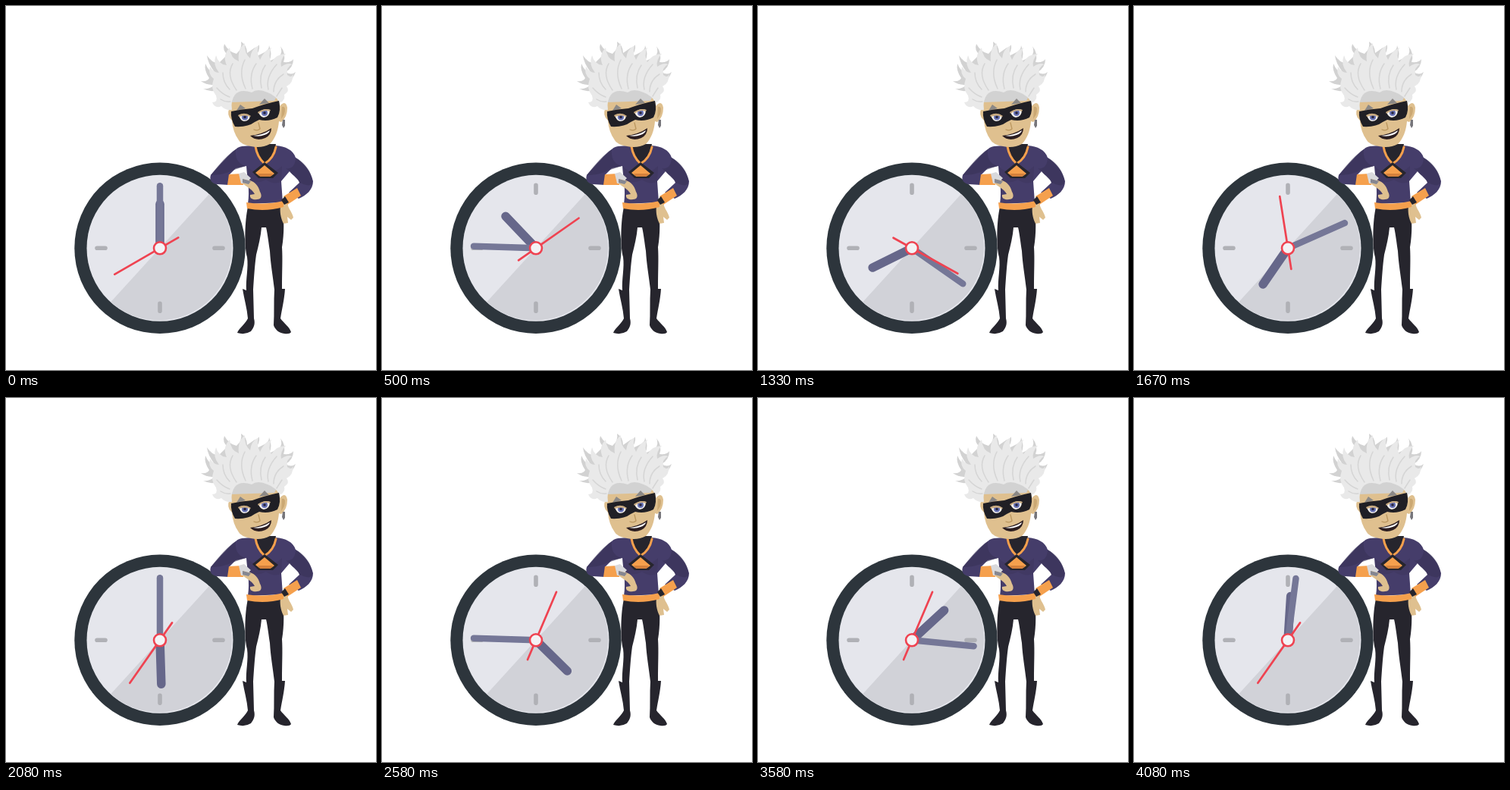
Recreate the animation shown at these times as an HTML page. Size 488 by 480 pixels, loop 4160 ms.

```html
<!DOCTYPE html>
<html lang="en">
<head>
<meta charset="utf-8">
<title>Hero and clock</title>
<style>
  html, body { margin: 0; width: 100%; height: 100%; overflow: hidden; background: #fff; }
  svg { display: block; width: 488px; height: 480px; }
  .skin { fill: #dfc08f; }
  .suit { fill: #453d6a; }
  .suit-dark { fill: #393258; }
  .dark { fill: #26252d; }
  .orange { fill: #f5a04d; }
  .line { fill: none; stroke-linecap: round; stroke-linejoin: round; }
</style>
</head>
<body>
<svg viewBox="0 0 488 480">
  <g id="clock" transform="translate(203 319.3)">
    <circle r="112.7" fill="#2d353c"/>
    <circle r="96.5" fill="#e5e6ec"/>
    <path d="M65-71.3A96.5 96.5 0 0 1-65 71.3Z" fill="#d1d2d8"/>
    <path class="line" stroke="#b0b1b6" stroke-width="5.6" d="M0-83V-73M0 73V83M-83 0H-72M72 0H83"/>
    <g class="line">
      <path id="hour" stroke="#66678a" stroke-width="11.5" d="M0 0V-58"/>
      <path id="minute" stroke="#757797" stroke-width="8.5" d="M0 0V-82"/>
      <path id="second" stroke="#ef4351" stroke-width="2.7" d="M0 28V-69"/>
    </g>
    <circle r="8" fill="#f3f3f5" stroke="#ef4351" stroke-width="2.6"/>
  </g>

  <g id="hero">
    <!-- legs and boots -->
    <path class="dark" d="M319 265L364 264C367 281 367 300 364 318C365 334 364 350 364 373L368 373C367 388 364 399 362 412C366 418 374 423 376 430Q374 433 367 432C360 431 355 427 353 421C354 405 353 390 354 374C352 356 349 341 348 323C346 310 345 300 343 292L337 292C336 304 333 316 330 328C328 342 327 359 326 374L327 412C329 419 327 424 323 429Q315 434 305 431C307 425 316 419 319 412C318 399 314 386 312 373L317 375C316 360 320 345 318 331C314 316 315 283 319 265Z"/>

    <!-- hand on hip -->
    <path class="skin" d="M363 256L372 259C370 265 377 270 379 279L376 282L371 278L372 286L366 287C362 279 361 271 362 263Z"/>

    <!-- torso and arms -->
    <path class="suit" d="M330 184C319 185 309 183 303 189C294 196 284 207 270 223C268 229 271 234 278 235L294 236L295 222L303 214L317 211C318 227 322 242 319 261L365 259L363 231L374 218C379 224 386 228 387 233L373 246L386 254C396 250 405 242 405 231C402 218 393 207 382 200C379 190 369 185 355 184Z"/>
    <path class="suit-dark" d="M303 189C292 196 282 208 270 223C277 223 289 222 298 217L316 211C305 208 302 199 303 189ZM382 200C382 210 376 216 369 214L374 218C379 224 386 228 387 233C393 235 400 239 404 234C405 219 393 206 382 200Z" opacity=".6"/>
    <path class="suit-dark" d="M318 212Q329 222 340 217Q352 223 364 211L363 232Q352 236 343 229Q332 235 319 231Z" opacity=".35"/>
    <path class="dark" d="M329 182L356 182L354 193L342 208L331 196Z"/>
    <path class="line" stroke="#f5a04d" stroke-width="3" d="M329 185Q331 199 341 208Q353 201 356 186"/>
    <path class="dark" d="M341 206L359 220L352 227H333L325 219Z"/>
    <path class="orange" d="M341 210L354 221L350 224H334L329 220Z"/>
    <path fill="#d4813b" d="M332 221H352L349 225H335Z"/>
    <path class="orange" d="M317 259Q342 263 366 257L366 265Q342 272 318 267ZM366 251L384 240L389 250L371 262ZM294 222L311 221L313 236L292 236Z"/>
    <path class="dark" d="M363 256L368 251L373 259L367 262Z"/>

    <!-- resting hand -->
    <path class="skin" d="M311 224L322 230C328 232 333 237 335 245C338 250 337 255 331 255C326 256 321 254 322 249L328 248C324 241 318 239 312 234Z"/>
    <path fill="#d9d9dc" d="M307 221L314 219L323 227L320 230L313 228L313 234L310 234Z"/>
    <path fill="#858792" d="M312 228L323 231L320 235L312 233Z"/>

    <!-- head -->
    <path class="skin" d="M296 120L324 107L360 119L361 132Q369 123 371 134Q371 147 363 153L360 152C359 164 355 175 348 182Q337 188 323 185Q309 182 307 177Q299 166 298 151Q290 144 295 134Z"/>
    <path fill="#cba873" d="M364 133Q370 131 367 143L363 149Z"/>
    <path fill="#77767b" d="M365 150H368V158L366 161L364 157Z"/>

    <!-- hair -->
    <path fill="#d2d2d2" d="M278 103Q267 106 257 99Q266 100 268 95Q261 85 263 76Q268 88 275 87Q266 75 265 65Q272 76 281 75L292 64Q285 58 288 50Q294 61 304 63Q312 56 310 47Q318 52 318 62L328 55Q332 55 334 51Q335 59 329 67L341 61Q347 58 347 52Q352 64 347 73L361 66Q365 60 362 53Q370 63 366 74Q376 75 379 70Q379 81 369 87Q376 92 382 87Q377 101 367 99L354 125L297 127ZM276 103Q270 110 260 109Q270 114 278 111Z"/>
    <path fill="#e9e9e9" d="M298 137Q289 138 284 132Q276 136 272 127Q280 127 277 118Q269 109 274 96Q266 90 269 80Q274 88 281 88Q272 77 277 65Q280 77 291 78Q285 65 295 55Q296 69 307 73Q305 57 315 49Q314 62 322 69Q323 57 333 52Q330 62 335 71Q340 59 350 55Q345 66 350 74Q357 63 369 63Q361 71 363 80Q372 74 377 77Q369 81 371 91Q378 96 379 88Q379 102 370 106Q375 112 367 117Q369 124 361 128Q356 118 345 114Q332 108 324 114Q309 109 302 117Q296 125 298 137Z"/>
    <g class="line" stroke="#d5d5d5" stroke-width="1.5">
      <path d="M286 88Q286 101 295 110M299 76Q290 91 304 111M315 71Q306 88 316 109M330 76Q320 90 325 109M342 78Q333 91 337 108M357 77Q342 94 346 110M366 90Q353 98 353 113M278 108Q286 117 295 120M283 123Q289 127 296 126M364 108Q360 114 357 119"/>
    </g>

    <!-- mask and face -->
    <path fill="#8b8886" d="M304 138L309 130L316 135ZM334 130L341 122L347 128Z"/>
    <path fill="#201f25" d="M297 139Q311 136 325 135Q341 129 360 125Q363 138 358 147Q346 153 334 150L328 153Q319 160 302 159Q296 149 297 139Z"/>
    <g id="eyes">
      <path fill="#f4f1ed" d="M307 144Q316 140 322 145Q321 152 314 152Q309 151 307 144ZM333 140Q342 134 348 137Q348 146 340 147Q335 146 333 140Z"/>
      <circle cx="315" cy="146.5" r="4" fill="#6671b5"/>
      <circle cx="341" cy="141" r="4" fill="#6671b5"/>
      <circle cx="315" cy="146.5" r="1.8" fill="#25253d"/>
      <circle cx="341" cy="141" r="1.8" fill="#25253d"/>
      <path fill="#c8aa80" d="M306 144Q315 139 323 145L322 146Q315 143 307 146ZM332 140Q341 134 349 137L348 139Q341 136 333 142Z"/>
    </g>
    <path class="line" stroke="#bb975f" stroke-width="1.3" d="M333 154L335 162Q332 165 327 163"/>
    <path fill="#2b1d20" d="M322 171Q339 169 350 161Q350 170 342 174Q330 179 322 171Z"/>
    <path fill="#fff" d="M326 171Q339 170 348 164Q347 168 341 170Q334 173 326 171Z"/>
  </g>
</svg>
<script>
  const LOOP = 4160, STEP = 1000 / 12;
  const hands = ["hour", "minute", "second"].map(id => document.getElementById(id));
  const start = performance.now();

  // All hands run backwards; the faster two rest briefly after each turn.
  function angles(tick) {
    const sweep = 32 * (tick % 12 - 0.22);
    return [
      -360 * tick / 49.5,
      -360 * (tick % 25) / 24.5,
      240 - Math.min(360, Math.max(0, sweep))
    ];
  }

  function draw(now) {
    const time = Math.max(0, now - start) % LOOP;
    const tick = Math.floor((time + 5) / STEP);
    angles(tick).forEach((angle, i) => hands[i].setAttribute("transform", `rotate(${angle})`));
    requestAnimationFrame(draw);
  }
  draw(start);
</script>
</body>
</html>
```
